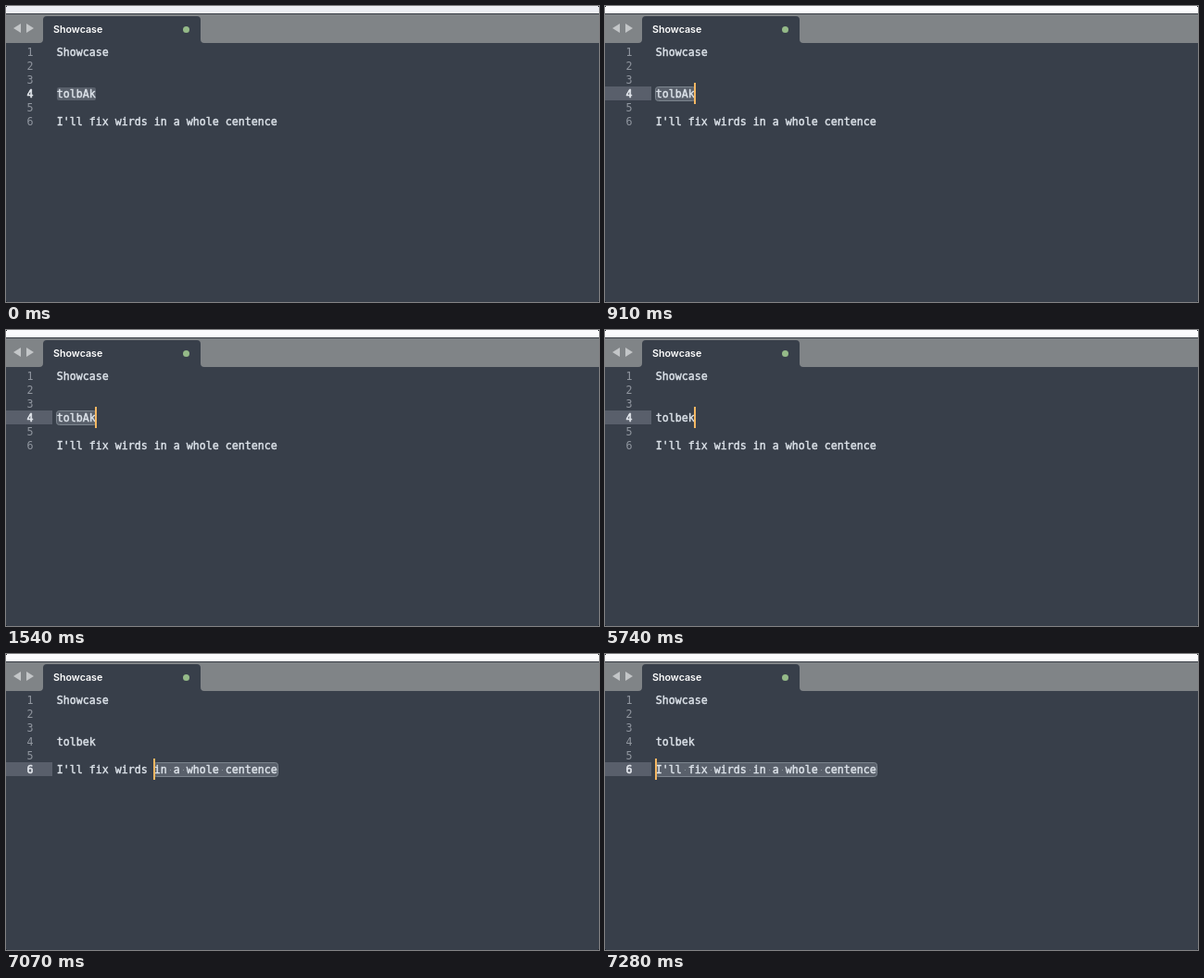
An HTML page with a canvas that plays this animation: 640 by 320 pixels, repeating every 8000 ms.

```html
<!DOCTYPE html>
<html lang="en">
<head>
<meta charset="utf-8">
<title>Editor</title>
<style>
  html, body { margin: 0; width: 100%; height: 100%; overflow: hidden; background: #383f4a; }
  canvas { display: block; }
</style>
</head>
<body>
<canvas id="stage" width="640" height="320"></canvas>
<script>
const ctx = document.getElementById('stage').getContext('2d');
const LOOP = 8000;
const TEXT_X = 55, CHAR_W = 7, LINE_H = 15;
const MONO = '11.63px "DejaVu Sans Mono", monospace';
const SENTENCE = "I'll fix wirds in a whole centence";

const COLOR = {
  editor: '#383f4a', bar: '#808487', edge: '#343941', corner: '#20242b',
  text: '#dfe5ec', number: '#90969f', active: '#e2e6ec',
  row: '#595f6b', selection: '#59606b', outline: '#7c858e',
  caret: '#f4b762', space: '#8a929b', arrow: '#c3c6c8', dot: '#95ba88'
};

// Each state lasts until the next; line, anchor and caret are in text positions.
const STATES = [
  { at: 0, line: 4, word: 'tolbAk', anchor: 0, caret: 6, focused: false },
  { at: 910, line: 4, word: 'tolbAk', anchor: 0, caret: 6, focused: true },
  { at: 5740, line: 4, word: 'tolbek', anchor: 6, caret: 6, focused: true },
  { at: 6930, line: 6, word: 'tolbek', anchor: 34, caret: 34, focused: true },
  { at: 7000, line: 6, word: 'tolbek', anchor: 34, caret: 20, focused: true },
  { at: 7070, line: 6, word: 'tolbek', anchor: 34, caret: 15, focused: true },
  { at: 7140, line: 6, word: 'tolbek', anchor: 34, caret: 0, focused: true }
];

const colX = col => TEXT_X + col * CHAR_W;
const midY = line => 50 + (line - 1) * LINE_H;

function rect(x, y, w, h, fill) {
  ctx.fillStyle = fill;
  ctx.fillRect(x, y, w, h);
}

function shape(fill, build) {
  ctx.beginPath();
  build();
  ctx.fillStyle = fill;
  ctx.fill();
}

// A thin outline thickens the glyphs between regular and bold.
function label(str, x, y, fill, font, weight = 0) {
  ctx.font = font;
  ctx.fillStyle = ctx.strokeStyle = fill;
  ctx.fillText(str, x, y);
  if (!weight) return;
  ctx.lineWidth = weight;
  ctx.lineJoin = 'round';
  ctx.strokeText(str, x, y);
}

function triangle(tipX, baseX) {
  shape(COLOR.arrow, () => {
    ctx.moveTo(tipX, 24);
    ctx.lineTo(baseX, 19);
    ctx.lineTo(baseX, 29);
  });
}

function tabOutline(left, right, top, bottom, r) {
  ctx.moveTo(left - r, bottom);
  ctx.arcTo(left, bottom, left, top, r);
  ctx.arcTo(left, top, right, top, r);
  ctx.arcTo(right, top, right, bottom, r);
  ctx.arcTo(right, bottom, right + r, bottom, r);
  ctx.lineTo(right + r, bottom);
}

function drawChrome(focused) {
  rect(0, 0, 640, 320, COLOR.editor);
  rect(0, 0, 640, 8, focused ? '#fbfbfd' : '#eceef3');
  rect(0, 8, 640, 1, COLOR.edge);
  rect(0, 9, 640, 31, COLOR.bar);
  for (const x of [0, 639]) {
    for (const y of [0, 319]) rect(x, y, 1, 1, COLOR.corner);
  }
  triangle(8, 16);
  triangle(30, 22);
  shape(COLOR.editor, () => tabOutline(40, 210, 11, 40, 4));
  label('Showcase', 51, 29, '#ffffff', '600 10.7px Inter, sans-serif');
  shape(COLOR.dot, () => ctx.arc(194.5, 25.5, 3.5, 0, Math.PI * 2));
}

function drawSelection({ line, anchor, caret, focused }) {
  if (anchor === caret) return;
  const left = colX(Math.min(anchor, caret));
  const width = Math.abs(anchor - caret) * CHAR_W;
  const y = midY(line);
  if (!focused) {
    shape(COLOR.selection, () => ctx.roundRect(left, y - 7, width, 14, 2));
    return;
  }
  shape(COLOR.selection, () => ctx.roundRect(left - 0.5, y - 7.5, width + 1, 15, 3));
  ctx.strokeStyle = COLOR.outline;
  ctx.lineWidth = 1;
  ctx.stroke();
}

function drawSpaces({ line, anchor, caret }, str) {
  for (let col = Math.min(anchor, caret); col < Math.max(anchor, caret); col++) {
    if (str[col] === ' ') rect(colX(col) + 3, midY(line), 1, 1, COLOR.space);
  }
}

function draw(time) {
  const state = STATES.findLast(s => s.at <= time);
  const lines = ['Showcase', '', '', state.word, '', SENTENCE];
  drawChrome(state.focused);
  if (state.focused) rect(0, midY(state.line) - 8, 50, 15, COLOR.row);
  drawSelection(state);
  lines.forEach((str, i) => {
    const active = i + 1 === state.line;
    const baseline = midY(i + 1) + 4;
    label(i + 1, 22.5, baseline, active ? COLOR.active : COLOR.number, MONO, active ? 0.6 : 0);
    label(str, TEXT_X - 0.3, baseline, COLOR.text, MONO, 0.4);
  });
  drawSpaces(state, lines[state.line - 1]);
  if (state.focused) rect(colX(state.caret) - 1, midY(state.line) - 12, 2, 23, COLOR.caret);
}

const start = performance.now();
function tick() {
  draw((performance.now() - start) % LOOP);
  requestAnimationFrame(tick);
}
tick();
</script>
</body>
</html>
```
